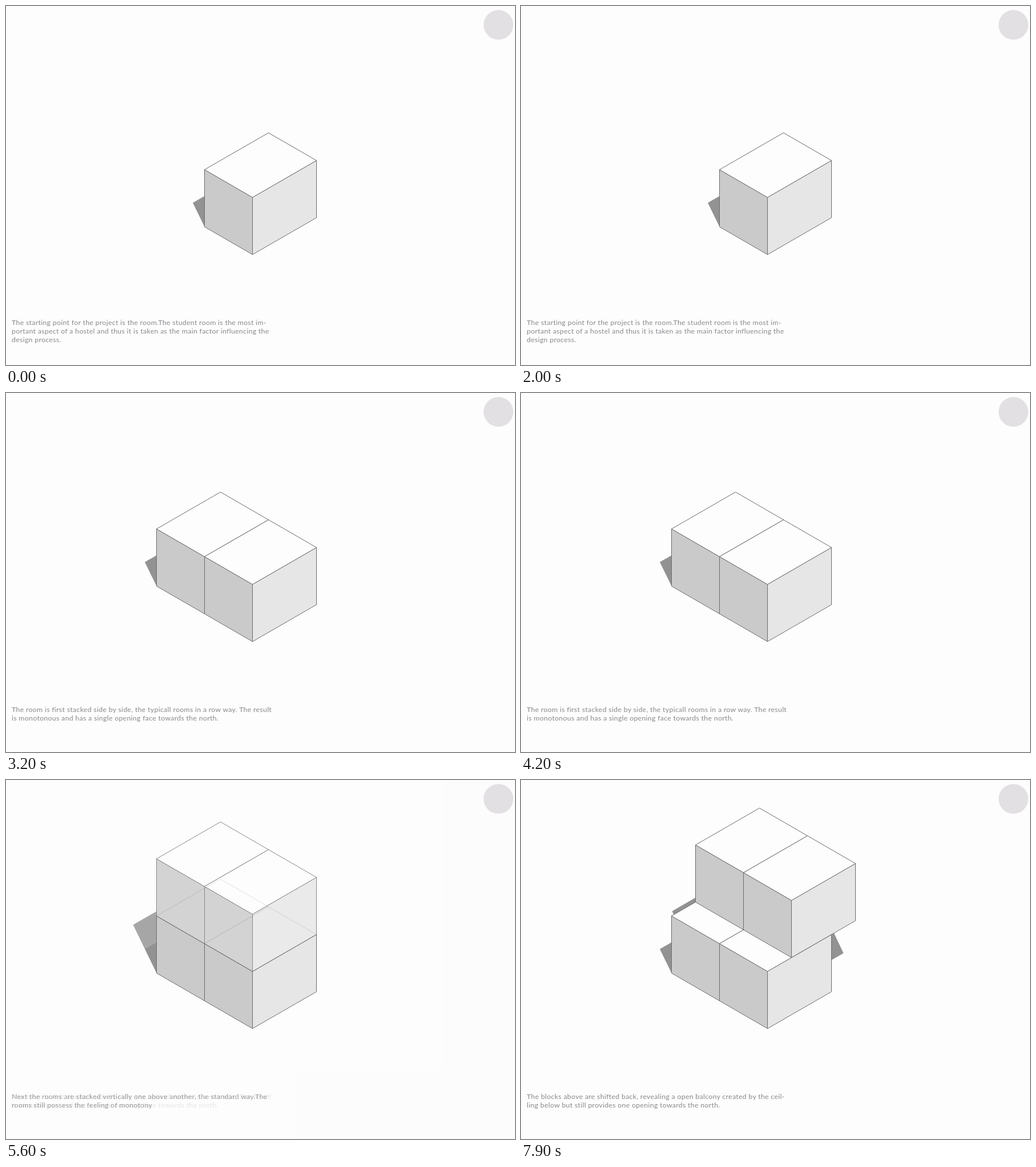
An HTML page that plays this animation: 891x628 px, repeating every 8 s.

```html
<!DOCTYPE html>
<html lang="en">
<head>
<meta charset="utf-8">
<title>Stacking rooms</title>
<style>
  html, body { margin: 0; width: 100%; height: 100%; overflow: hidden; background: #fdfdfd; }
  svg { display: block; width: 891px; height: 628px; }
  text { font: 12.3px Lato, "Open Sans", sans-serif; letter-spacing: .31px; fill: #88888e; }
  .face { stroke: #6c6c71; stroke-width: 1; stroke-linejoin: round; }
  .shadow { fill: #929292; }
</style>
</head>
<body>
<svg id="stage" viewBox="0 0 891 628"></svg>
<script>
const LOOP = 8000;
const FADE = 500;
const stage = document.getElementById('stage');

// Isometric room: origin is the lower front corner, with row, depth and height axes.
const ORIGIN = [431.5, 434.8];
const ROW = [-84, -48.5];
const DEPTH = [112, -64.5];
const HEIGHT = [0, -100];

function add(parent, tag, attrs, content) {
  const node = document.createElementNS('http://www.w3.org/2000/svg', tag);
  for (const key in attrs) node.setAttribute(key, attrs[key]);
  if (content) node.textContent = content;
  parent.appendChild(node);
  return node;
}

function project(r, d, h) {
  return [0, 1].map(i => ORIGIN[i] + r * ROW[i] + d * DEPTH[i] + h * HEIGHT[i]);
}

function drawRoom(parent, [r, d, h]) {
  const face = (fill, ...corners) => add(parent, 'polygon', {
    class: 'face', fill,
    points: corners.map(([x, y, z]) => project(r + x, d + y, h + z)).join(' ')
  });
  face('#cacaca', [0, 0, 0], [1, 0, 0], [1, 0, 1], [0, 0, 1]);
  face('#e6e6e6', [0, 0, 0], [0, 1, 0], [0, 1, 1], [0, 0, 1]);
  face('#fdfdfd', [0, 0, 1], [1, 0, 1], [1, 1, 1], [0, 1, 1]);
}

const row = (d, h) => [[1, d, h], [0, d, h]];

const scenes = [
  {
    start: -FADE,
    rooms: [[0, 0, 0]],
    shadows: ['347.5,386.3 327,344.3 347.5,332.5'],
    lines: [
      'The starting point for the project is the room.The student room is the most im-',
      'portant aspect of a hostel and thus it is taken as the main factor influencing the',
      'design process.'
    ]
  },
  {
    start: 2500,
    rooms: row(0, 0),
    shadows: ['263.5,337.8 243,295.8 263.5,284'],
    lines: [
      'The room is first stacked side by side, the typicall rooms in a row way. The result',
      'is monotonous and has a single opening face towards the north.'
    ]
  },
  {
    start: 5200,
    rooms: [...row(0, 0), ...row(0, 1)],
    shadows: ['263.5,337.8 222.5,253.3 263.5,229.7'],
    lines: [
      'Next the rooms are stacked vertically one above another, the standard way.The',
      'rooms still possess the feeling of monotony'
    ]
  },
  {
    start: 7250,
    rooms: [...row(0, 0), ...row(.375, 1)],
    shadows: [
      '263.5,337.8 243,295.8 263.5,284',
      '305.5,205.7 264.5,229.5 267.5,236 305.5,214',
      '543.5,267 547.5,267 564.5,303 543.5,315'
    ],
    lines: [
      'The blocks above are shifted back, revealing a open balcony created by the ceil-',
      'ling below but still provides one opening towards the north.'
    ]
  }
];

for (const scene of scenes) {
  scene.group = add(stage, 'g', {});
  add(scene.group, 'rect', { width: 891, height: 628, fill: '#fdfdfd' });
  scene.shadows.forEach(points => add(scene.group, 'polygon', { class: 'shadow', points }));
  scene.rooms.forEach(room => drawRoom(scene.group, room));
  scene.lines.forEach((line, i) => add(scene.group, 'text', { x: 10, y: 558 + 15 * i }, line));
}
add(stage, 'circle', { cx: 862, cy: 33, r: 26, fill: '#e3e0e3' });

function render(time) {
  for (const { group, start } of scenes) {
    const opacity = Math.min(1, Math.max(0, (time - start) / FADE));
    group.setAttribute('opacity', opacity);
  }
}

const began = performance.now();
function tick() {
  render((performance.now() - began) % LOOP);
  requestAnimationFrame(tick);
}
render(0);
requestAnimationFrame(tick);
</script>
</body>
</html>
```
